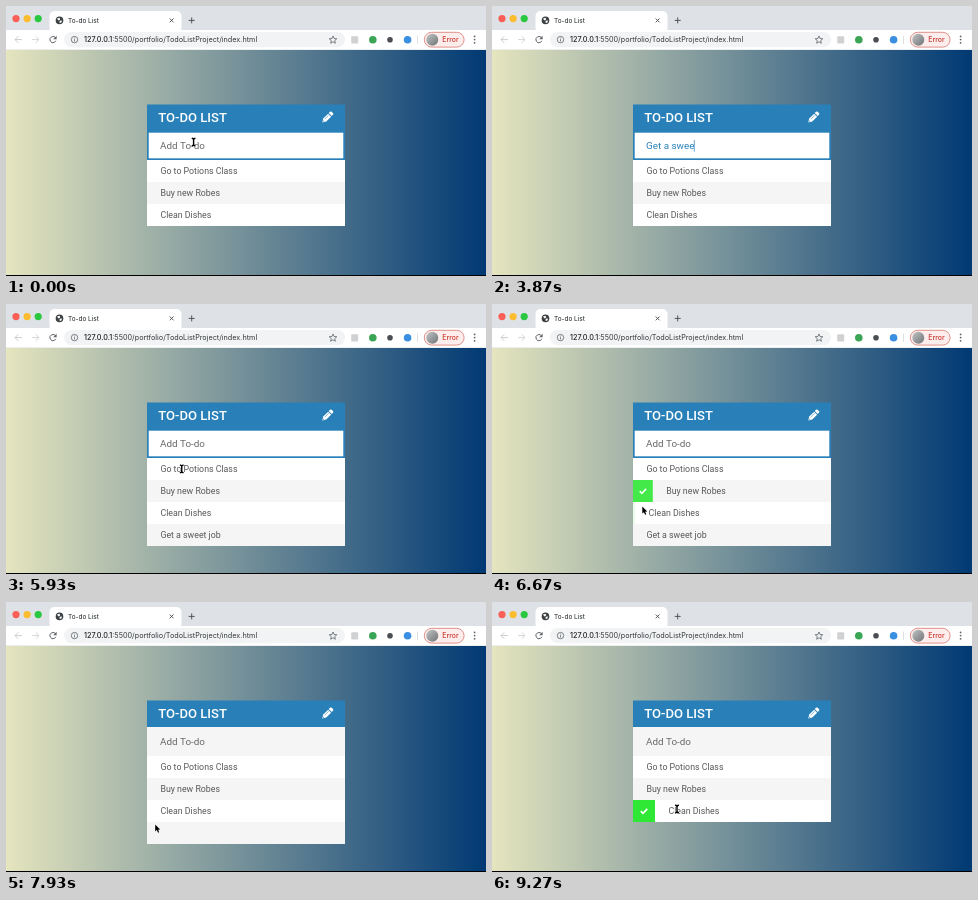
Write an HTML page with a canvas that moves like this. It is 480 px wide and 270 px high and loops after 9470 ms.

```html
<!DOCTYPE html>
<html lang="en">
<head>
<meta charset="utf-8">
<title>To-do List</title>
<style>
  html, body { margin: 0; width: 100%; height: 100%; overflow: hidden; background: #fff; }
  canvas { display: block; width: 480px; height: 270px; }
</style>
</head>
<body>
<canvas id="stage"></canvas>
<script>
const W = 480, H = 270, LOOP = 9470, STEP = 200 / 3;
const canvas = document.getElementById('stage');
const ctx = canvas.getContext('2d');
const scale = window.devicePixelRatio || 1;
canvas.width = W * scale;
canvas.height = H * scale;

const BLUE = '#2980b9', GREEN = '#2fe836', PALE = '#f5f5f5', INK = '#5f6368';
const CARD = { x: 141, y: 98.5, w: 198, input: 125, list: 154, row: 22 };
const ITEMS = ['Go to Potions Class', 'Buy new Robes', 'Clean Dishes', 'Get a sweet job'];

const KEY_GAP = 150, BLINK = 515, SLIDE = 200, HOVER_LAG = 55;
const BURSTS = [{ at: 1380, keys: 6 }, { at: 3330, keys: 9 }];
const HIDE = 1200, SHOW = 5500, ADDED = 5070, BLUR = 7470, FADE = 7450, REMOVED = 8000;
// Pointer path: [time, x, y]
const POINTER = [[0, 187, 136], [130, 206, 137], [5530, 206, 137], [5900, 180, 150],
  [5970, 172, 178], [6270, 150, 190], [6470, 150, 190], [6670, 150.3, 202.5],
  [7070, 149.2, 222.5], [8400, 149.2, 222.5], [9200, 185, 207]];

const clamp = v => Math.max(0, Math.min(1, v));

function rect(x, y, w, h, color) {
  ctx.fillStyle = color;
  ctx.fillRect(x, y, w, h);
}

function round(x, y, w, h, r, color) {
  ctx.beginPath();
  ctx.roundRect(x, y, w, h, r);
  ctx.fillStyle = color;
  ctx.fill();
}

function dot(x, y, r, color) {
  ctx.beginPath();
  ctx.arc(x, y, r, 0, Math.PI * 2);
  ctx.fillStyle = color;
  ctx.fill();
}

function text(str, x, y, size, color, family = 'Roboto', weight = 400) {
  ctx.font = `${weight} ${size}px ${family}, sans-serif`;
  ctx.fillStyle = color;
  ctx.fillText(str, x, y);
  return ctx.measureText(str).width;
}

function trace(points, close) {
  ctx.beginPath();
  points.forEach(([x, y], i) => i ? ctx.lineTo(x, y) : ctx.moveTo(x, y));
  if (close) ctx.closePath();
}

function line(points, color, width, close) {
  trace(points, close);
  ctx.strokeStyle = color;
  ctx.lineWidth = width;
  ctx.stroke();
}

function shape(points, color) {
  trace(points, true);
  ctx.fillStyle = color;
  ctx.fill();
}

// Two crossing strokes: a plus sign, or a close mark when turned
function cross(x, y, r, turn, color) {
  for (const a of [turn, turn + Math.PI / 2]) {
    const dx = r * Math.cos(a), dy = r * Math.sin(a);
    line([[x - dx, y - dy], [x + dx, y + dy]], color, 0.95);
  }
}

function drawTabs() {
  rect(0, 0, W, 24, '#dee1e6');
  ['#f95e57', '#fbbd2f', '#2ac840'].forEach((c, i) => dot(10 + i * 11.1, 12.6, 3.6, c));
  round(43.5, 5, 132, 22, 5, '#fff');

  dot(53.5, 14.4, 3.8, '#3c4043');
  shape([[51, 12.4], [53.6, 11.8], [54.2, 13.4], [52.4, 14.6]], '#fff');
  shape([[53.6, 14.8], [56, 14.4], [55.4, 16.4], [53.6, 17]], '#fff');
  text('To-do List', 62, 16.8, 6.4, '#3c4043', 'Inter', 500);
  cross(165.6, 14.4, 2.7, Math.PI / 4, '#4d5156');
  cross(185.7, 14.4, 3, 0, '#4d5156');
}

function navArrow(x, dir, color) {
  const y = 33.6;
  line([[x - 3.4 * dir, y], [x + 3.4 * dir, y]], color, 0.9);
  line([[x + 0.2 * dir, y - 3.3], [x + 3.5 * dir, y], [x + 0.2 * dir, y + 3.3]], color, 0.9);
}

function drawToolbar() {
  rect(0, 24, W, 20, '#fff');
  navArrow(12.5, -1, '#c4c7ca');
  navArrow(29.5, 1, '#cfd1d3');

  ctx.beginPath();
  ctx.arc(47, 33.6, 3.1, -0.5, -Math.PI * 2 + 0.4, true);
  ctx.strokeStyle = INK;
  ctx.lineWidth = 1;
  ctx.stroke();
  shape([[50.6, 29.8], [50.6, 33.2], [47.2, 33.2]], INK);

  round(58, 26, 281, 15.2, 7.6, '#f1f3f4');
  ctx.beginPath();
  ctx.arc(68.5, 33.6, 3.2, 0, Math.PI * 2);
  ctx.lineWidth = 0.8;
  ctx.stroke();
  rect(68.1, 33.2, 0.8, 2.2, INK);
  rect(68.1, 31.6, 0.8, 0.8, INK);

  const host = text('127.0.0.1', 78, 36.2, 7.25, '#202124', 'Inter', 500);
  text(':5500/portfolio/TodoListProject/index.html', 78 + host, 36.2, 7.25, '#36393c', 'Inter');

  const star = Array.from({ length: 10 }, (_, i) => {
    const a = i * Math.PI / 5 - Math.PI / 2, r = i % 2 ? 1.8 : 4;
    return [327 + r * Math.cos(a), 34 + r * Math.sin(a)];
  });
  line(star, INK, 0.8, true);

  round(345.2, 30.2, 7, 7.4, 1, '#cfd1d3');
  dot(366.8, 33.8, 3.8, '#3aa655');
  dot(384, 33.8, 2.8, '#4a4d51');
  dot(401.6, 33.8, 3.8, '#3b8fe0');
  rect(411, 29.5, 0.7, 8.5, '#d0d3d6');

  round(418.3, 26.3, 39.8, 14.8, 7.4, '#fdeeed');
  ctx.strokeStyle = '#d9766e';
  ctx.lineWidth = 0.8;
  ctx.stroke();
  const tone = ctx.createLinearGradient(420, 28, 432, 40);
  tone.addColorStop(0, '#c3c5c6');
  tone.addColorStop(1, '#6f7375');
  dot(426.3, 33.7, 6, tone);
  text('Error', 436.3, 36.2, 6.9, '#c9352b', 'Inter', 500);
  for (let i = -1; i <= 1; i++) dot(468.6, 33.6 + i * 3.2, 0.9, INK);
  rect(0, 43, W, 0.7, '#e4e5e7');
}

function drawPage() {
  const sky = ctx.createLinearGradient(0, 0, W, 0);
  sky.addColorStop(0, '#e5e5be');
  sky.addColorStop(1, '#003973');
  rect(0, 43.5, W, H - 43.5, sky);
  rect(0, H - 1, W, 1, '#000');
}

function drawPencil() {
  ctx.save();
  ctx.translate(316.3, 116.5);
  ctx.rotate(-Math.PI / 4);
  shape([[0, 0], [3.4, -2.1], [10.4, -2.1], [10.4, 2.1], [3.4, 2.1]], '#fff');
  round(11.2, -2.1, 3, 4.2, [0, 1.2, 1.2, 0], '#fff');
  line([[4, -0.6], [9.6, -0.6]], BLUE, 0.5);
  dot(1.9, 0, 0.5, BLUE);
  ctx.restore();
}

function keysTyped(t) {
  if (t >= ADDED) return 0;
  return BURSTS.reduce((n, { at, keys }) =>
    n + Math.max(0, Math.min(keys, Math.floor((t - at) / KEY_GAP) + 1)), 0);
}

// The caret stays lit during typing and restarts its blink after the last key
function caretOn(t) {
  if (t >= BLUR) return false;
  let last = -BLINK;
  for (const { at, keys } of BURSTS) {
    if (t >= at) last = Math.min(t, at + (keys - 1) * KEY_GAP);
  }
  if (t >= ADDED) last = ADDED;
  return Math.floor((t - last) / BLINK) % 2 === 0;
}

function drawInput(t) {
  const { x, w, input, list } = CARD, focus = t < BLUR, edge = 1.7;
  rect(x, input, w, list - input, focus ? BLUE : PALE);
  if (focus) rect(x + edge, input + edge, w - 2 * edge, list - input - 2 * edge, '#fff');

  const typed = keysTyped(t), left = x + 13;
  let end = left;
  if (typed) end += text(ITEMS[3].slice(0, typed), left, 143.3, 9.9, BLUE) - 0.6;
  else text('Add To-do', left, 143.3, 9.9, '#686868');
  if (caretOn(t)) rect(end, 134, 0.7, 11.6, typed ? BLUE : '#4d6f88');
}

function pointerAt(t) {
  const i = POINTER.findIndex(p => p[0] > t);
  if (i < 0) return POINTER[POINTER.length - 1].slice(1);
  const [t0, x0, y0] = POINTER[i - 1], [t1, x1, y1] = POINTER[i];
  const k = (t - t0) / (t1 - t0);
  return [x0 + (x1 - x0) * k, y0 + (y1 - y0) * k];
}

const rowAt = y => Math.floor((y - CARD.list) / CARD.row);

// Share of the check box that has slid out, replayed from the pointer path
function reveal(row, t) {
  const tick = 10;
  let open = 0;
  for (let s = SHOW; s < t; s += tick) {
    const over = rowAt(pointerAt(s - HOVER_LAG)[1]) === row;
    open = clamp(open + (over ? tick : -tick) / SLIDE);
  }
  return open;
}

function drawItem(row, t) {
  const { x, w, list, row: h } = CARD;
  const y = list + row * h;
  rect(x, y, w, h, PALE);
  const fade = row === 3 ? 0.5 + Math.cos(Math.PI * clamp((t - FADE) / 500)) / 2 : 1;
  const open = reveal(row, t), box = open * h;
  ctx.globalAlpha = fade;
  rect(x, y, w, h, row % 2 ? PALE : '#fff');
  text(ITEMS[row], x + 13.4 + box, y + 14.1, 8.8, '#585858');
  if (open > 0) {
    ctx.globalAlpha = fade * open;
    rect(x, y, box, h, GREEN);
    const cx = x + Math.max(4, box / 2), cy = y + 11;
    line([[cx - 3.2, cy + 0.1], [cx - 1, cy + 2.3], [cx + 3.3, cy - 2.1]], '#fff', 1.7);
  }
  ctx.globalAlpha = 1;
}

function drawCard(t) {
  const rows = t >= ADDED && t < REMOVED ? 4 : 3;
  const { x, y, w, input } = CARD;
  rect(x, y, w, input - y, BLUE);
  text('TO-DO LIST', x + 11.3, 116, 13.1, '#fff', 'Roboto', 500);
  drawPencil();
  drawInput(t);
  for (let i = 0; i < rows; i++) drawItem(i, t);
  return rows;
}

function drawPointer(t, rows) {
  if (t >= HIDE && t < SHOW) return;
  const [x, y] = pointerAt(t);
  const row = rowAt(y);
  const overText = row < 0 || (row < rows && x > CARD.x + 13.4 + reveal(row, t) * CARD.row);
  ctx.save();
  ctx.translate(x, y);
  if (overText) {
    for (const [color, width] of [['#fff', 2.2], ['#000', 1.4]]) {
      line([[0, -3.2], [0, 3.2]], color, width);
      for (const s of [-1, 1]) line([[-1.8, 4 * s], [0, 3.1 * s], [1.8, 4 * s]], color, width);
    }
  } else {
    const arrow = [[0, 0], [0, 7], [1.6, 5.6], [2.8, 8.3], [4, 7.8], [2.9, 5.2], [5, 5]];
    line(arrow, '#fff', 1.2, true);
    shape(arrow, '#000');
  }
  ctx.restore();
}

function frame() {
  const now = performance.now() % LOOP;
  // The picture advances fifteen times a second
  const t = Math.floor((now + 4) / STEP) * STEP + 4;
  ctx.setTransform(scale, 0, 0, scale, 0, 0);
  drawPage();
  drawTabs();
  drawToolbar();
  drawPointer(t, drawCard(t));
  requestAnimationFrame(frame);
}
frame();
</script>
</body>
</html>
```
